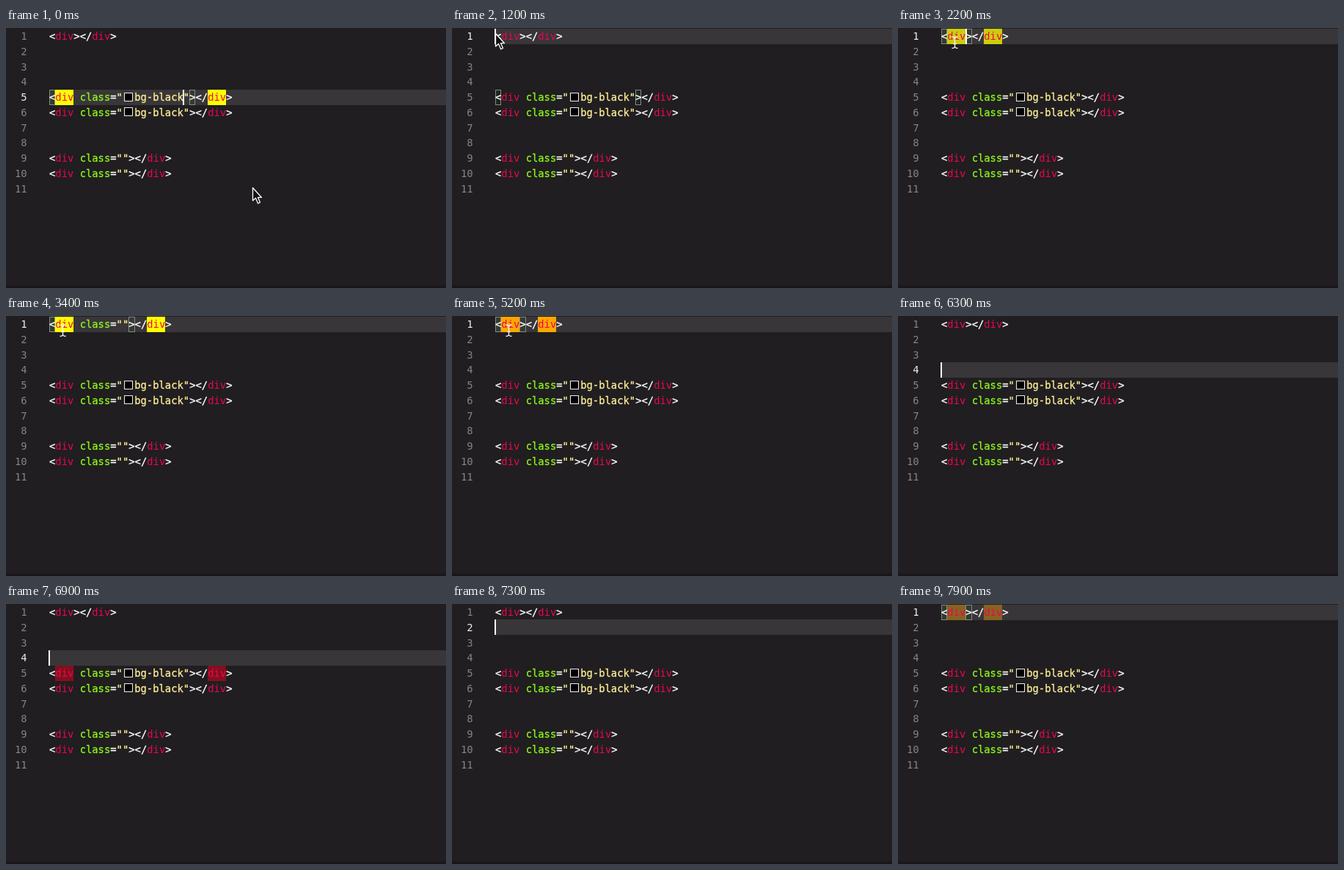
An HTML page for the animation above (8000 ms loop, 600 by 354 pixels).

```html
<!DOCTYPE html>
<html lang="en">
<head>
<meta charset="utf-8">
<title>Matching tag highlight</title>
<style>
html, body { margin: 0; width: 100%; height: 100%; overflow: hidden; background: #201e20; }
#stage {
  position: relative; width: 600px; height: 354px; overflow: hidden;
  background: #201e20; color: #fff;
  font: 13.84px/20.75px "DejaVu Sans Mono", monospace;
}
#stage::after { content: ""; position: absolute; left: 0; right: 0; top: 351px; height: 3px; background: #1b151a; }
.num, .code, #band, #caret, svg { position: absolute; }
.num { left: 0; width: 28.7px; text-align: right; color: #858385; }
.num.on { color: #f0f0f0; }
.code { left: 59px; white-space: pre; -webkit-text-stroke: .3px; }
#band { left: 59px; right: 0; height: 21px; background: #383638; }
#caret { width: 2px; height: 21px; background: #fff; }
.tag, .br { display: inline-block; vertical-align: top; }
.tag { color: #ec064f; -webkit-text-stroke: 0; }
.attr { color: #8df51e; }
.str { color: #ffee99; }
.br.on { box-shadow: inset 0 0 0 1px #868886; background: rgba(0, 100, 0, .12); }
.swatch {
  display: inline-block; box-sizing: border-box; width: 12px; height: 12px;
  margin: 0 2.3px 0 2px; vertical-align: -.5px; border: 1.4px solid #eee; background: #000;
}
svg { left: 0; top: 0; overflow: visible; }
</style>
</head>
<body>
<div id="stage">
  <div id="band"></div>
  <div id="text"></div>
  <div id="caret"></div>
  <svg width="600" height="354">
    <path id="arrow" d="M0 0V17.5L4 14L7 21.3L10 20L7 13.2H12Z" fill="#111" stroke="#fff" stroke-width="1.3" stroke-linejoin="round"/>
    <path id="beam" d="M73.5 12Q77.5 12 77.5 14.5Q77.5 12 81.5 12M77.5 14V25.5M73.5 27.5Q77.5 27.5 77.5 25Q77.5 27.5 81.5 27.5M75.3 21.5H79.7" fill="none" stroke="#f4f4f4" stroke-width="1.3"/>
  </svg>
</div>
<script>
const LOOP = 8000, STEP = 100, ROW = 20.75, TOP = 1.1, LEFT = 59, CHAR = 8.33, SWATCH = 16.3;
const CLICK = 1200, INSIDE = 1900, LEAVE = 5500, ENTER = 6400, RETURN = 6900;
const ATTR = ' class=""';
const BLACK = '<i class="swatch"></i>bg-black';
const values = { 5: BLACK, 6: BLACK, 9: "", 10: "" };

const $ = id => document.getElementById(id);
const rowY = line => TOP + ROW * (line - 1);
const ramp = (t, from, to) => Math.min(1, Math.max(0, (t - from) / (to - from)));
const span = (cls, text, style = "") => `<span class="${cls}" style="${style}">${text}</span>`;

// The attribute on line 1 is typed, then deleted
const typed = t => Math.round(ATTR.length * (ramp(t, 2500, 2900) - ramp(t, 3500, 4400)));

function caretAt(t) {
  if (t < CLICK) return { line: 5, col: 20 };
  if (t < INSIDE) return { line: 1, col: 0 };
  if (t < LEAVE) return { line: 1, col: 4 + Math.min(typed(t), ATTR.length - 1) };
  if (t < ENTER) return { line: 2 + Math.floor((t - LEAVE) / 300), col: 0 };
  if (t < RETURN) return { line: 5, col: 0 };
  const line = Math.max(1, 4 - Math.floor((t - RETURN) / 160));
  return { line, col: line === 1 ? 2 : 0 };
}

// The blink restarts whenever the caret moves
function caretVisible(t, { line, col }) {
  let since = t;
  while (since > 0) {
    const before = caretAt(since - STEP);
    if (before.line !== line || before.col !== col) break;
    since -= STEP;
  }
  return (t - since) % 1000 < 500;
}

function fillAt(line, t) {
  let hue = 60, light = 50, alpha = 0;
  if (line === 1) {
    hue -= 21 * ramp(t, 4500, 5200);
    alpha = ramp(t, INSIDE, 2300) - ramp(t, LEAVE, 5800) + .4 * ramp(t, 7700, 7900);
  } else if (line === 5 && t < CLICK) {
    alpha = 1;
  } else if (line === 5) {
    hue = 352;
    light = 45;
    alpha = .5 * (ramp(t, ENTER, 6700) - ramp(t, RETURN, 7200));
  }
  return `hsla(${hue}, 100%, ${light}%, ${alpha})`;
}

function attribute(line, t) {
  if (line !== 1) return span("attr", " class") + "=" + span("str", `"${values[line]}"`);
  const part = ATTR.slice(0, typed(t));
  return span("attr", part.slice(0, 6)) + part.slice(6, 7) + span("str", part.slice(7));
}

function codeLine(line, t, boxed) {
  if (line !== 1 && !(line in values)) return "";
  const br = text => span(boxed ? "br on" : "br", text);
  const tag = span("tag", "div", `background:${fillAt(line, t)}`);
  return br("&lt;") + tag + attribute(line, t) + br("&gt;") + "&lt;/" + tag + "&gt;";
}

function drawText(t, active) {
  const previous = caretAt(t - STEP);
  let html = "";
  for (let n = 1; n <= 11; n++) {
    const y = `top:${rowY(n)}px`;
    const boxed = n === previous.line && previous.col > 0;
    html += `<div class="num${n === active ? " on" : ""}" style="${y}">${n}</div>`;
    html += `<div class="code" style="${y}">${codeLine(n, t, boxed)}</div>`;
  }
  $("text").innerHTML = html;
}

function drawPointer(t) {
  const p = ramp(t, 0, 1000);
  const e = p * p * (3 - 2 * p);
  $("arrow").setAttribute("transform", `translate(${336.5 - 277 * e} ${217.5 - 210 * e})`);
  $("arrow").style.display = t < 1700 ? "" : "none";
  $("beam").style.display = t >= 1700 && t < LEAVE ? "" : "none";
}

function draw(t) {
  const caret = caretAt(t);
  const x = LEFT + CHAR * caret.col + (caret.line === 5 && caret.col > 12 ? SWATCH : 0);
  const top = Math.floor(rowY(caret.line)) + "px";
  $("band").style.top = top;
  Object.assign($("caret").style, {
    left: x - .7 + "px",
    top,
    display: caretVisible(t, caret) ? "" : "none"
  });
  drawText(t, caret.line);
  drawPointer(t);
}

const start = performance.now();
let shown = -1;
function tick() {
  const t = Math.floor((performance.now() - start) % LOOP / STEP) * STEP;
  if (t !== shown) draw(shown = t);
  requestAnimationFrame(tick);
}
tick();
</script>
</body>
</html>
```
